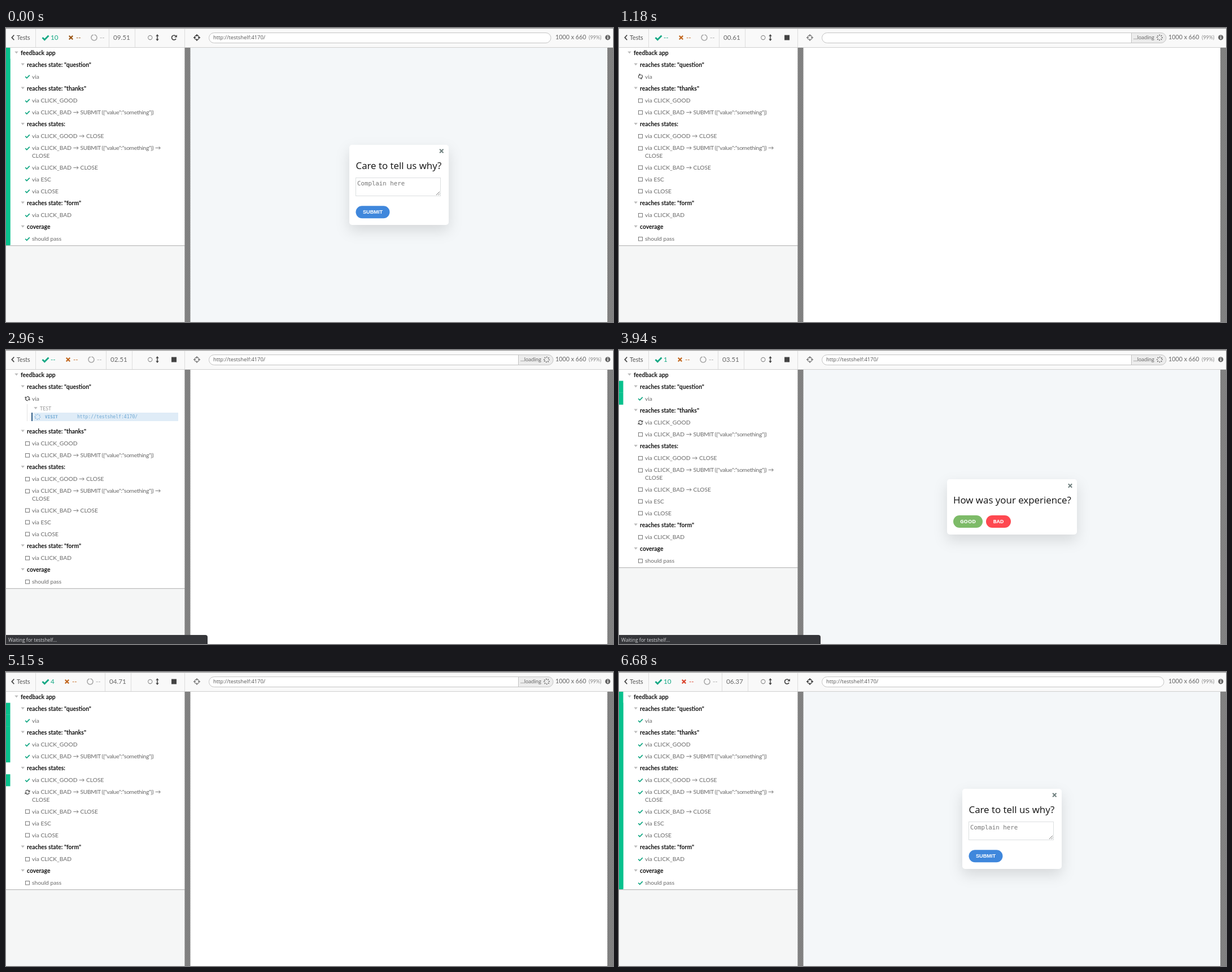
Animation of 1075x521 px, one loop 7.31 s. Source, as an HTML page:

```html
<!DOCTYPE html>
<html lang="en">
<head>
<meta charset="utf-8">
<title>Test runner</title>
<style>
  html, body { margin: 0; width: 100%; height: 100%; overflow: hidden; background: #f5f6f6; }
  svg { display: block; width: 1075px; height: 521px; }
  text { font: 10.25px Lato, "DejaVu Sans", sans-serif; fill: #686868; white-space: pre; }
  .suite { font-size: 10.35px; font-weight: 700; fill: #111; }
  .tight { letter-spacing: -.35px; }
  .bar { font-size: 11.7px; }
  .url { font: 9.4px "Open Sans", "Noto Sans", sans-serif; fill: #555; }
  .status { font: 8.5px "Open Sans", "Noto Sans", sans-serif; fill: #d4d6d8; }
  .mono { font: 8.1px "DejaVu Sans Mono", monospace; fill: #6ea8d4; }
  .title { font: 16.9px "Open Sans", "Noto Sans", sans-serif; fill: #111; }
  .button { font: 700 9.2px "Open Sans", "Noto Sans", sans-serif; fill: #fff; text-anchor: middle; }
  .arial { font-family: "Liberation Sans", Arial, sans-serif; }
  .hint { font: 10.75px "DejaVu Sans Mono", monospace; fill: #757575; }
  .line { fill: none; }
  .card { filter: drop-shadow(0 10px 12px rgba(0, 0, 0, .12)); }
</style>
</head>
<body>
<svg id="stage" viewBox="0 0 1075 521" xmlns="http://www.w3.org/2000/svg"></svg>
<script>
const LOOP = 7310, RESET = 210, RUN = 600, DONE = 6680;
const LOG_OPEN = 1550, FIRST_LOAD = 3640, LOG_HEIGHT = 37;
const HOST = 'testshelf', URL_TEXT = `http://${HOST}:4170/`;
const GREEN = '#08c18d', TEAL = '#14a884', STRIP = 7.5;

// start time of each test
const starts = [RUN, 3920, 4320, 4720, 5110, 5440, 5760, 6080, 6370, 6650, DONE];
// [time in the loop, seconds on the run clock]
const clock = [[RUN, 0], [1180, .6], [2960, 2.5], [3940, 3.5], [5150, 4.7], [6260, 5.9], [DONE, 6.37]];

const SUBMIT = 'via CLICK_BAD → <tspan class="tight">SUBMIT ({"value":"something"})</tspan>';
const suites = [
  ['reaches state: "question"', 'via'],
  ['reaches state: "thanks"', 'via CLICK_GOOD', SUBMIT],
  ['reaches states:', 'via CLICK_GOOD → CLOSE', SUBMIT + ' →|CLOSE', 'via CLICK_BAD → CLOSE', 'via ESC', 'via CLOSE'],
  ['reaches state: "form"', 'via CLICK_BAD'],
  ['coverage', 'should pass']
];

const text = (x, y, s, cls = '', attrs = '') => `<text x="${x}" y="${y}" class="${cls}" ${attrs}>${s}</text>`;
const rect = (x, y, w, h, fill, attrs = '') => `<rect x="${x}" y="${y}" width="${w}" height="${h}" fill="${fill}" ${attrs}/>`;
const line = (d, color, width, attrs = '') => `<path class="line" d="${d}" stroke="${color}" stroke-width="${width}" ${attrs}/>`;
const group = (id, body) => `<g id="${id}">${body}</g>`;
const at = (x, y, body) => `<g transform="translate(${x} ${y})">${body}</g>`;
const caret = (x, y) => `<path d="M${x - 3.2} ${y - 2}h6.4l-3.2 4z" fill="#bcbcbc"/>`;
const cross = (x, y, r, color, width) => line(`M${x - r} ${y - r}l${2 * r} ${2 * r}m0 ${-2 * r}l${-2 * r} ${2 * r}`, color, width);
const ring = (r, color, width, attrs = '') => `<circle fill="none" r="${r}" stroke="${color}" stroke-width="${width}" ${attrs}/>`;
const dots = color => ring(4.3, color, 2.1, 'class="dots" stroke-dasharray="1.3 2.077"');
const half = '<path class="line" d="M-3.5 -.6A3.5 3.5 0 0 1 2.6 -2.3" stroke="#555" stroke-width="1.4"/><path d="M4.2 -4.2v3.6h-3.6z" fill="#555"/>';
const refresh = half + `<g transform="rotate(180)">${half}</g>`;
const pill = (x, y, w, label, color, cls = '') =>
  rect(x, y, w, 22, color, 'rx="11"') + text(x + w / 2, y + 14, label, 'button ' + cls);

function buildList() {
  let y = 44, n = 0, head = caret(18.5, 43.5) + text(26, 47.6, 'feedback app', 'suite'), rest = '';
  const put = s => n ? rest += s : head += s;
  suites.forEach(([name, ...tests], k) => {
    y += 21.1;
    put(rect(0, y - 10.5, STRIP, 21.2, GREEN, `id="suite${k}"`) + caret(29.7, y - .7) + text(37, y + 3.6, name, 'suite'));
    for (const label of tests) {
      y += 21.1;
      const [first, wrapped] = label.split('|');
      put(rect(0, y - 10.5, STRIP, wrapped ? 34.3 : 21.2, GREEN, `id="strip${n}"`) +
        at(38, Math.round(y * 2) / 2,
          group('box' + n, rect(-3.5, -3, 7, 6.5, 'none', 'stroke="#777"')) +
          group('spin' + n, refresh) +
          group('tick' + n, line('M-3.8 .2l2.6 2.6l5 -5.2', TEAL, 1.8))) +
        text(46, y + 3.6, first) + (wrapped ? text(46, y + 16.9, wrapped) : ''));
      n++;
      if (wrapped) y += 13;
    }
  });
  return head + group('rest', rest);
}

const log = line('M37.5 96V126', '#e3e3e3', 1) + caret(52.5, 103) + text(60, 106.7, 'TEST', '', 'style="font-size:8.8px;fill:#999"') +
  rect(45, 111, 260, 15, '#dfecf7') + rect(45, 111, 2, 15, '#335f88') + at(56, 118.5, dots('#79aedb')) +
  text(69, 121.4, 'VISIT', 'mono', 'style="font-size:7.6px;font-weight:700"') + text(126, 121.4, URL_TEXT, 'mono');

const question = rect(581, 229, 230, 98, '#fff', 'rx="5" class="card"') + cross(799, 240.5, 3.2, '#70807f', 2) +
  text(592, 272, 'How was your experience?', 'title') +
  pill(592, 293, 52, 'GOOD', '#7dbb68') + pill(650, 293, 44, 'BAD', '#fe4850');

const form = rect(608, 207, 176, 142, '#fff', 'rx="5" class="card"') + cross(771.3, 218, 3.2, '#70807f', 2) +
  text(619.5, 250, 'Care to tell us why?', 'title') +
  rect(619.5, 265.5, 150, 32, '#fff', 'stroke="#dcdfe0"') + text(622, 279, 'Complain here', 'hint') +
  line('M762 296l6 -6M765.5 296l2.5 -2.5', '#777', 1) + pill(619.5, 315.2, 60, 'SUBMIT', '#3f87dc', 'arial');

const counters = cross(110, 17, 3.2, 'currentColor', 2.3) + text(119, 21, '--', 'bar', 'style="fill:currentColor"') +
  at(151, 17, ring(5, '#aaa', 1.6, 'stroke-dasharray="29 2.4" transform="rotate(-86)"')) + text(161, 21, '--', 'bar', 'style="fill:#aaa"') +
  line('M177.5 1V34', '#ddd', 1) + text(185, 21, '', 'bar', 'id="timer"');

const toolbar = rect(0, 0, 1075, 34, '#f9f9f9') + rect(0, 0, 1075, 1, '#999') + rect(0, 1, 1075, 1, '#e2e2e2') +
  line('M14.3 12.5l-4 4.4l4 4.4', '#444', 1.7) + text(19, 20.7, 'Tests', '', 'style="font-size:10.7px;fill:#555"') +
  line('M52.5 1V34M316.5 1V34', '#ddd', 1) + line('M64.5 17l3.8 3.8l7.2 -7.4', TEAL, 2.8) +
  text(79, 21, '', 'bar', `id="passed" style="fill:${TEAL}"`) + group('counters', counters) + line('M0 1V34', '#ddd', 1, 'id="edge"') +
  at(255.3, 17, ring(3.6, '#8a8a8a', 1.1)) +
  line('M268 13V21', '#444', 1.5) + '<path d="M265.2 14.6l2.8 -3.6l2.8 3.6zM265.2 19.4l2.8 3.6l2.8 -3.6z" fill="#444"/>' +
  group('stop', rect(293, 12.5, 9, 9, '#444')) +
  group('rerun', line('M301 19A4 4 0 1 1 300.4 14.2', '#444', 1.7) + '<path d="M302.8 12v4.6h-4.6z" fill="#444"/>') +
  group('aim', at(338, 17, ring(4, 'currentColor', 1.3) + line('M0 -6V-2M0 6V2M-6 0H-2M6 0H2', 'currentColor', 1.3))) +
  rect(359.5, 8.5, 605.5, 18, '#fff', 'rx="9" stroke="#c4c4c4"') + text(367, 20.2, URL_TEXT, 'url', 'id="url"') +
  group('loading', '<path d="M907.5 8.5H960a9 9 0 0 1 0 18H907.5z" fill="#ececec" stroke="#c4c4c4"/>' +
    text(911, 20.2, '...loading', '', 'style="font-size:9.5px"') + at(957.5, 17, dots('#555'))) +
  text(973, 20.3, '1000 x 660', '', 'style="font-size:10.75px"') + text(1032, 20, '(99%)', '', 'style="font-size:9px;fill:#888"') +
  '<circle cx="1065.7" cy="16.8" r="4.6" fill="#666"/>' + rect(1065, 16, 1.5, 3.5, '#fff') + rect(1065, 13.7, 1.5, 1.4, '#fff') +
  rect(0, 34, 1075, 1, '#cfcfcf');

stage.innerHTML = `<defs><pattern id="hatch" width="3" height="3" patternUnits="userSpaceOnUse">
    <rect width="3" height="3" fill="#777"/><path d="M-1 1l2 -2M0 3l3 -3M2 4l2 -2" stroke="#979797" stroke-width=".9"/></pattern></defs>` +
  rect(0, 35, 317, 486, '#f5f6f6') +
  group('list', rect(0, 35, 317, 350, '#fff', 'id="panel"') +
    group('foot', rect(0, 385, 317, 1, '#bdbdbd') + rect(0, 386, 317, 1, '#e6e7e7')) +
    buildList() + group('log', log) + rect(0, 35, STRIP, 350, GREEN, 'id="full"')) +
  rect(316.4, 35, 759, 486, 'url(#hatch)') + rect(326.5, 35, 738.5, 486, '#fff', 'id="view"') +
  group('question', question) + group('form', form) + toolbar +
  group('status', '<path d="M0 505H353a4 4 0 0 1 4 4V521H0z" fill="#35363a"/>' + text(4, 516.5, `Waiting for ${HOST}...`, 'status'));

const el = id => document.getElementById(id);
const show = (id, on) => el(id).setAttribute('display', on ? 'inline' : 'none');
const spinners = [...document.querySelectorAll('.dots')];

function runClock(t) {
  const k = clock.findIndex(([end]) => t < end);
  const [t0, a] = clock[k - 1], [t1, b] = clock[k];
  return Math.floor((a + (b - a) * (t - t0) / (t1 - t0) + .01) * 10) / 10 + .01;
}

// what a test leaves on the page
const outcome = i => i === 2 || i >= 8 ? 'form' : i >= 3 ? 'none' : 'question';

function pageAt(t) {
  if (t < RESET || t >= DONE) return 'form';
  if (t < RUN) return 'none';
  if (t < starts[1]) return t < FIRST_LOAD ? 'blank' : 'question';
  const i = starts.findIndex(s => t < s) - 1;
  const u = t - starts[i], length = starts[i + 1] - starts[i];
  if (u < 30) return outcome(i - 1);
  if (u < 140) return 'blank';
  if (i >= 3 && i <= 7 && u > length - 50) return 'none';
  return [2, 4, 5, 8].includes(i) && u > length * (i === 8 ? .95 : .6) ? 'form' : 'question';
}

function render(t) {
  const idle = t < RESET || t >= DONE, running = t >= RUN && t < DONE;
  const current = idle ? 10 : running ? starts.findIndex(s => t < s) - 1 : -1;
  const open = t >= LOG_OPEN && t < starts[1];
  const page = pageAt(t);

  show('list', idle || running);
  show('full', idle);
  show('log', open);
  const shift = `translate(0 ${open ? LOG_HEIGHT : 0})`;
  el('rest').setAttribute('transform', shift);
  el('foot').setAttribute('transform', shift);
  el('panel').setAttribute('height', open ? 350 + LOG_HEIGHT : 350);

  let n = 0;
  suites.forEach((suite, k) => {
    for (let j = 1; j < suite.length; j++, n++) {
      show('strip' + n, n < current);
      show('tick' + n, n < current);
      show('spin' + n, n === current);
      show('box' + n, n > current);
    }
    show('suite' + k, n <= current);
  });
  if (running) el('spin' + current).setAttribute('transform', `rotate(${(t - starts[current]) * .18 % 360})`);
  spinners.forEach(s => s.setAttribute('transform', `rotate(${t * .18 % 360})`));

  const dx = current >= 10 ? 5 : current > 0 ? -2 : 0;
  el('passed').textContent = current > 0 ? current : '--';
  el('counters').setAttribute('transform', `translate(${dx} 0)`);
  el('counters').style.color = t < RESET ? '#995413' : t >= DONE ? '#da432c' : '#c2661d';
  el('timer').textContent = t < RESET ? '09.51' : t >= DONE ? '06.37' : running ? runClock(t).toFixed(2).padStart(5, '0') : '--';
  el('edge').setAttribute('transform', `translate(${(idle || running ? 223.5 : 202.5) + dx} 0)`);
  show('stop', !idle);
  show('rerun', idle);
  el('aim').style.color = idle ? '#333' : '#777';

  show('url', t < RESET || t >= LOG_OPEN);
  show('loading', running && (t < FIRST_LOAD || current > 0 && t - starts[current] < 140));
  show('status', t >= RESET && t < 430 || t >= 2450 && t < 4000);
  el('view').setAttribute('fill', page === 'blank' ? '#fff' : '#f4f7f9');
  show('question', page === 'question');
  show('form', page === 'form');
}

const origin = performance.now();
function tick() {
  render((performance.now() - origin) % LOOP);
  requestAnimationFrame(tick);
}
tick();
</script>
</body>
</html>
```
